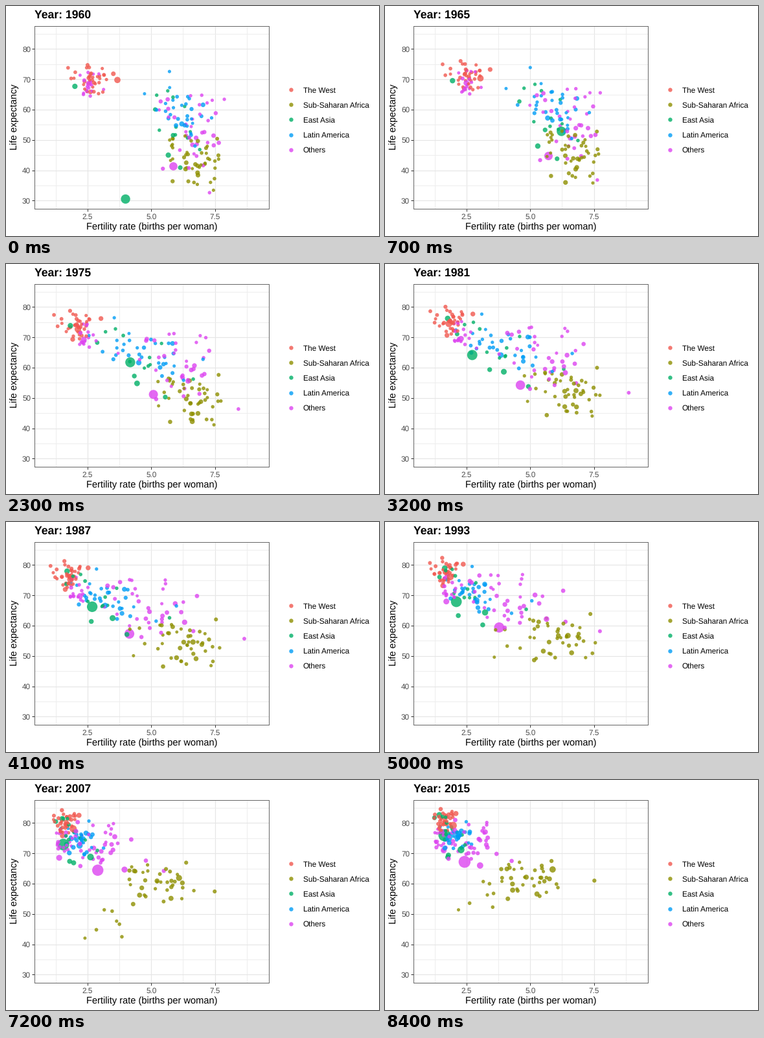
Recreate the animation shown at these times as a matplotlib script. Size 576x355 px, loop 10 s.

```python
import numpy as np
import matplotlib.pyplot as plt
from matplotlib.animation import FuncAnimation

W, H, DPI = 576, 355, 96
FRAMES, STEPS, INTERVAL = 100, 84, 100
FIRST, LAST = 1960, 2015
YEARS = np.linspace(FIRST, LAST, STEPS + 1)
PROGRESS = (YEARS - FIRST) / (LAST - FIRST)

WEST, AFRICA, EAST, LATIN, OTHER = range(5)
NAMES = ["The West", "Sub-Saharan Africa", "East Asia", "Latin America", "Others"]
COLORS = ["#F1584F", "#8E8F00", "#00B067", "#009CF5", "#DD44F0"]
ALPHA = 0.8

rng = np.random.default_rng(12)
bubbles = []  # (group, x path, y path, radius path)


def blend(start, end, t=PROGRESS):
    return start + (end - start) * t


def add_bubble(group, x, y, pop_start, pop_end):
    """Populations are in millions and grow exponentially."""
    pop = pop_start * (pop_end / pop_start) ** PROGRESS
    bubbles.append((group, x, y, 2.3 + 7.1 * np.sqrt(pop / 1376)))


def track(group, pops, *points):
    """A large country moving through a few (year, fertility, life) points."""
    years, xs, ys = zip(*points)
    add_bubble(group, np.interp(YEARS, years, xs), np.interp(YEARS, years, ys), *pops)


def cloud(group, count, fertility, life, mid, lag, sd_x, sd_y, corr=0.3, dip=0):
    """Small countries passing through the demographic transition.

    Fertility falls on a logistic curve centred on `mid`, each country delayed
    by a multiple of `lag` years; late countries also live shorter lives.
    `dip` lowers life expectancy for a while around 2005.
    """
    mean_life = blend(*life, 1 - (1 - PROGRESS) ** 1.4)
    mean_life = mean_life - dip * np.exp(-((YEARS - 2005) / 9) ** 2)
    turn = 0.9 * PROGRESS
    for _ in range(count):
        delay, u0, u1, v0, v1 = np.clip(rng.normal(size=5), -1.8, 1.8)
        u = u0 * np.cos(turn) + u1 * np.sin(turn)
        v = v0 * np.cos(turn) + v1 * np.sin(turn)
        fall = 1 / (1 + np.exp(-(YEARS - mid - lag * delay) / 7))
        health = np.sqrt(1 - corr ** 2) * v - corr * delay
        pop = np.clip(rng.lognormal(1.7, 1.1), 0.3, 45)
        add_bubble(group, blend(*fertility, fall) + blend(*sd_x) * u,
                   mean_life + blend(*sd_y) * health, pop, 1.7 * pop)


cloud(WEST, 36, fertility=(2.9, 1.63), life=(69.7, 80.8), mid=1971, lag=4,
      sd_x=(0.45, 0.24), sd_y=(2.4, 1.8), corr=0.2)
cloud(AFRICA, 36, fertility=(6.75, 4.6), life=(43, 61.5), mid=1999, lag=8,
      sd_x=(0.5, 0.65), sd_y=(4.9, 3.0))
cloud(AFRICA, 7, fertility=(6.3, 3.1), life=(46, 60), mid=1991, lag=6,
      sd_x=(0.5, 0.5), sd_y=(4, 4), dip=13)
cloud(EAST, 13, fertility=(6.3, 1.8), life=(55, 74.5), mid=1978, lag=9,
      sd_x=(0.4, 0.3), sd_y=(7, 5), corr=0.7)
cloud(LATIN, 31, fertility=(6.6, 2.1), life=(58.5, 75.5), mid=1979, lag=8,
      sd_x=(0.45, 0.3), sd_y=(6, 2.3), corr=0.75)
cloud(OTHER, 16, fertility=(2.7, 1.5), life=(68, 74), mid=1987, lag=5,
      sd_x=(0.4, 0.2), sd_y=(2.3, 2.4))
cloud(OTHER, 35, fertility=(6.7, 2.6), life=(52, 73), mid=1990, lag=10,
      sd_x=(0.7, 0.45), sd_y=(6.5, 3.8), corr=0.45)

track(WEST, (180, 321), (1960, 3.67, 69.8), (1969, 2.44, 70.9),
      (1981, 1.8, 74.5), (2015, 1.97, 79.2))
track(AFRICA, (45, 182), (1960, 6.35, 40.4), (1969, 6.42, 31.7),
      (1981, 6.8, 52.5), (2015, 5.88, 64.7))
track(AFRICA, (3.4, 20), (1960, 7.33, 36), (2015, 7.52, 61))
track(EAST, (650, 1376), (1960, 3.99, 30.5), (1964, 6.3, 52), (1969, 5.67, 59.3),
      (1981, 2.71, 64.2), (1987, 2.68, 66.3), (1999, 1.46, 69.7), (2015, 1.63, 76))
track(EAST, (93, 127), (1960, 2.0, 67.7), (1984, 1.72, 77.5), (2015, 1.43, 82.7))
track(EAST, (88, 257), (1960, 5.67, 45), (1987, 3.47, 62.6), (2015, 2.28, 71.2))
track(LATIN, (72, 206), (1960, 6.2, 55.3), (1987, 3.17, 66.7), (2015, 1.8, 74.9))
track(OTHER, (450, 1311), (1960, 5.87, 41.3), (1969, 5.57, 48),
      (1987, 4.13, 57.4), (2015, 2.42, 67.2))
track(OTHER, (45, 189), (1960, 6.62, 48.4), (1987, 6.31, 61.2), (2015, 3.03, 66))
track(OTHER, (120, 144), (1960, 2.55, 68.6), (1987, 2.2, 69.8),
      (1999, 1.16, 66), (2015, 1.6, 71))
track(OTHER, (5, 27), (1960, 7.29, 32.6), (1984, 9.1, 54.5), (2015, 4.27, 67.5))

bubbles = [bubbles[i] for i in rng.permutation(len(bubbles))]
groups, X, Y, R = (np.array(column) for column in zip(*bubbles))


def area(r):
    """Scatter size in square points for a pixel radius."""
    return (2 * r * 72 / DPI) ** 2


plt.rcParams.update({"font.family": "Liberation Sans", "text.hinting": "none"})
px = 72 / DPI
fig = plt.figure(figsize=(W / DPI, H / DPI), dpi=DPI, facecolor="white")

left, right, top, bottom = 44, 406, 31, 313
ax = fig.add_axes([left / W, 1 - bottom / H, (right - left) / W, (bottom - top) / H])
ax.set(xlim=(0.413, 9.624), ylim=(27.28, 87.59))
ax.set_axisbelow(True)
ax.set_xticks([2.5, 5.0, 7.5])
ax.set_yticks(range(30, 90, 10))
ax.set_xticks([1.25, 3.75, 6.25, 8.75], minor=True)
ax.set_yticks(range(35, 90, 10), minor=True)
ax.grid(which="major", color="#E6E6E6", lw=1.2 * px)
ax.grid(which="minor", color="#EDEDED", lw=px)
ax.tick_params(which="major", length=3.6 * px, width=px, pad=2.3 * px,
               color="#333333", labelcolor="#4D4D4D", labelsize=8.8)
ax.tick_params(axis="x", pad=3.3 * px)
ax.tick_params(which="minor", length=0)
for spine in ax.spines.values():
    spine.set(color="#666666", linewidth=px)

page = fig.add_axes([0, 0, 1, 1])
page.set(xlim=(0, W), ylim=(H, 0))
page.axis("off")
title = page.text(44, 19, "", size=13.2, weight="bold")
page.text(225.3, 345, "Fertility rate (births per woman)", size=11, ha="center")
page.text(13, 171.5, "Life expectancy", size=11, rotation=90, ha="center", va="center")
for row, (name, color) in enumerate(zip(NAMES, COLORS)):
    y = 129.4 + 23.04 * row
    page.scatter(440, y, s=area(3.2), color=color, alpha=ALPHA, lw=0)
    page.text(458.6, y + 4.4, name, size=8.8)

scatter = ax.scatter(X[:, 0], Y[:, 0], s=area(R[:, 0]), alpha=ALPHA, lw=0, zorder=2,
                     c=[COLORS[group] for group in groups])


def update(frame):
    step = min(frame, STEPS)
    scatter.set_offsets(np.column_stack([X[:, step], Y[:, step]]))
    scatter.set_sizes(area(R[:, step]))
    title.set_text(f"Year: {round(YEARS[step])}")
    return scatter, title


anim = FuncAnimation(fig, update, frames=FRAMES, interval=INTERVAL, repeat=True)
plt.show()
```
